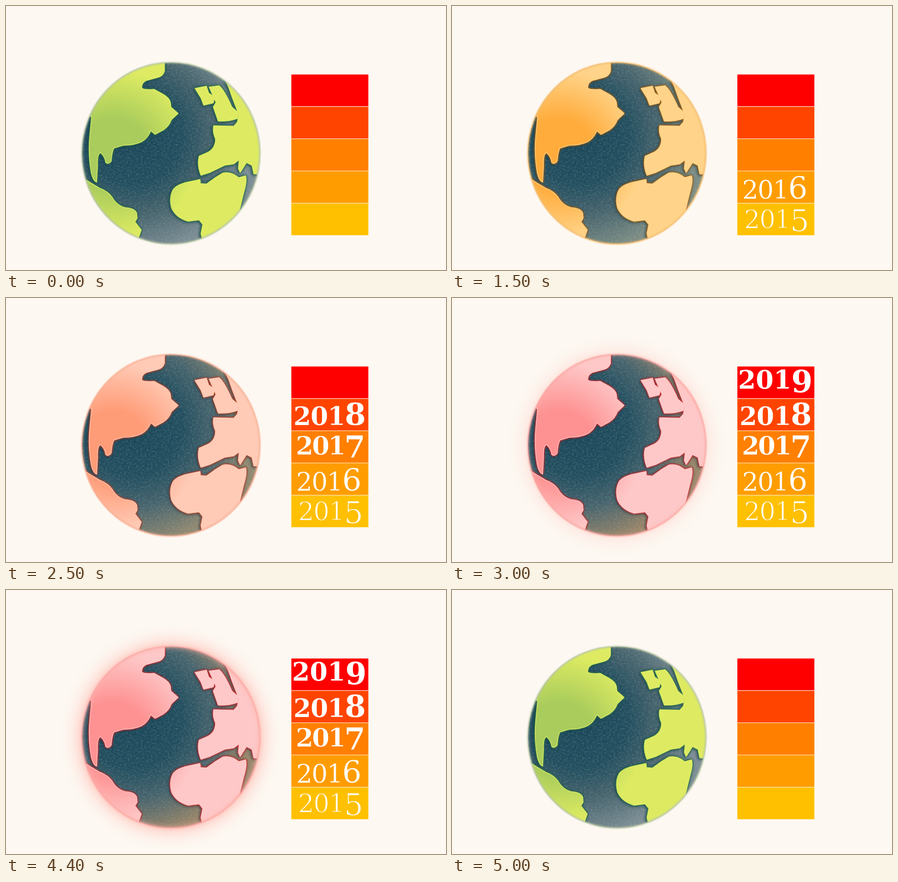
An HTML page that plays this animation: 966 by 580 pixels, repeating every 6 s.

```html
<!DOCTYPE html>
<html lang="en">
<head>
<meta charset="utf-8">
<title>Warming globe</title>
<style>
  html, body { margin: 0; width: 100%; height: 100%; overflow: hidden; background: #fdf8f2; }
  svg { display: block; width: 100%; height: 100%; }
  text { fill: #fff; stroke-linejoin: round; font: 56px "DejaVu Serif", serif; }
  .lands { fill: url(#land); stroke: var(--light); stroke-width: 1.5; stroke-linejoin: round;
           filter: blur(.7px) drop-shadow(0 0 2px var(--fringe)) drop-shadow(0 0 .8px var(--fringe))
                   drop-shadow(-2px 1px 2.5px #0d3442b0); }
</style>
</head>
<body>
<svg id="stage" viewBox="0 0 966 580">
  <defs>
    <radialGradient id="ocean" gradientUnits="userSpaceOnUse" cx="280" cy="285" r="255">
      <stop offset="0" stop-color="#194658"/>
      <stop offset=".42" stop-color="#214d5e"/>
      <stop offset=".68" stop-color="#46636c"/>
      <stop offset="1" style="stop-color: var(--haze)"/>
    </radialGradient>
    <radialGradient id="land" gradientUnits="userSpaceOnUse" cx="235" cy="325" r="195">
      <stop offset=".4" style="stop-color: var(--deep)"/>
      <stop offset=".95" style="stop-color: var(--light)"/>
    </radialGradient>
    <clipPath id="disc"><ellipse cx="362" cy="323.5" rx="195" ry="199"/></clipPath>
    <filter id="soft" x="-5%" y="-5%" width="110%" height="110%"><feGaussianBlur stdDeviation="1.6"/></filter>
    <filter id="halo" x="-40%" y="-40%" width="180%" height="180%"><feGaussianBlur stdDeviation="21"/></filter>
    <filter id="rimBlur" x="-10%" y="-10%" width="120%" height="120%"><feGaussianBlur stdDeviation="4"/></filter>
    <filter id="felt">
      <feTurbulence type="fractalNoise" baseFrequency=".22 .28" numOctaves="2" seed="4"/>
      <feColorMatrix values="0 0 0 0 .45  0 0 0 0 .58  0 0 0 0 .6  2 0 0 0 -.8"/>
      <feComposite in2="SourceGraphic" operator="in"/>
    </filter>
  </defs>

  <rect width="966" height="580" fill="#fdf8f2"/>
  <ellipse id="glow" cx="362" cy="323.5" rx="200" ry="204" fill="#ff6050" filter="url(#halo)"/>

  <ellipse cx="362" cy="323.5" rx="194" ry="198" filter="url(#soft)"
           style="fill: none; stroke: var(--rim); stroke-width: 5"/>
  <g clip-path="url(#disc)">
    <ellipse cx="362" cy="323.5" rx="195" ry="199" fill="url(#ocean)"/>
    <ellipse cx="362" cy="323.5" rx="195" ry="199" filter="url(#felt)" opacity=".24"/>
    <g class="lands">
      <path d="M348 115 V143 Q345 154 333 157 L307 164 Q297 170 298 180 Q302 185 325 183 L345 194 Q359 202 361 212
               L362 222 378 236 363 250 Q358 264 346 272 L327 282 318 274 Q311 291 298 298 Q282 306 257 306 L237 312
               Q232 322 231 341 Q224 349 219 344 Q217 330 207 322 Q200 326 201 350 L199 387
               Q191 384 187 365 Q180 325 184 285 L188 243 150 230 200 110Z"/>
      <path d="M165 375 L185 388 205 400 Q224 407 233 420 Q243 438 262 443 Q282 444 287 455 L288 466 283 474
               297 492 290 512 260 540 160 470Z"/>
      <path d="M415 181 L440 176 445 191 458 200 455 213 434 218 428 202Z"/>
      <path d="M446 178 L468 175 Q480 185 496 222 L510 234 508 247 Q490 254 466 253 L455 222 461 212Z"/>
      <path d="M480 160 L489 179 497 202 511 238 508 255 500 264 456 263 Q453 277 460 292 Q460 312 444 321
               L424 330 Q419 350 428 372 L447 366 480 350 500 347 512 338 510 357 514 366 523 352 528 344
               540 350 544 369 553 369 590 320 550 180Z"/>
      <path d="M426 381 L427 390 440 391 458 378 476 367 Q494 363 511 377 L526 373 Q530 384 522 410 L513 447
               530 470 465 525 431 512 428 500 432 480 424 470 400 473 Q374 466 364 445 Q357 422 367 403
               Q376 392 398 387Z"/>
    </g>
  </g>
  <ellipse cx="362" cy="323.5" rx="194.5" ry="198.5" filter="url(#soft)"
           style="fill: none; stroke: var(--rim); stroke-width: 3; opacity: .65"/>
  <ellipse id="rimGlow" cx="362" cy="323.5" rx="194" ry="198" fill="none" stroke="#ffb5ac" stroke-width="9" filter="url(#rimBlur)"/>

  <g id="scale"></g>
</svg>
<script>
  const stage = document.getElementById('stage');
  const scale = document.getElementById('scale');

  // Land shades, coastline fringe, sea haze and rim, from cool to hot.
  const palettes = [
    ['#a9cc5c', '#deeb62', '#2d7350', '#7b8c93', '#b9c6a4'],
    ['#f9ba14', '#fddc70', '#a8700f', '#748a90', '#f3c65a'],
    ['#ffac3c', '#ffd48a', '#ac6412', '#7c8c84', '#f7bd6c'],
    ['#ffa868', '#ffd0a8', '#b45818', '#868c78', '#f8b880'],
    ['#ff9c78', '#ffcbb6', '#c4442a', '#908870', '#fbb094'],
    ['#fe9292', '#fec8c8', '#dc2c2c', '#988468', '#fda6a2']
  ];
  const paletteNames = ['--deep', '--light', '--fringe', '--haze', '--rim'];

  // Bottom row first; "drop" lowers the final digit, "thin" trims the strokes.
  const rows = [
    { color: '#ffc000', x: 641, base: 488, weight: 400, thin: 1.6, spacing: -2, drop: 7 },
    { color: '#ff9d00', x: 637, base: 423, weight: 400, thin: .4, spacing: -2, drop: 0 },
    { color: '#ff7f00', x: 636, base: 344, weight: 700, thin: .8, spacing: -3.5, drop: 7 },
    { color: '#ff4400', x: 631, base: 279, weight: 700, thin: .4, spacing: -1.5, drop: 0 },
    { color: '#ff0000', x: 628, base: 199, weight: 700, thin: 0, spacing: 0, drop: 8 }
  ];
  scale.innerHTML = rows.map((r, i) => `
    <rect x="626" y="${433.2 - 70.8 * i}" width="170" height="70.8" fill="${r.color}" stroke="#fff4e2"/>
    <text x="${r.x}" y="${r.base}" stroke="${r.color}" stroke-width="${r.thin}"
      style="font-weight:${r.weight};letter-spacing:${r.spacing}px"
      >201<tspan dy="${r.drop}" style="font-size:67px">${5 + i}</tspan></text>`).join('');
  const years = scale.querySelectorAll('text');

  function stateAt(t) {
    if (t < 1000) return [0, 0];
    if (t < 3000) return [1 + Math.floor((t - 1000) / 500), 0];
    if (t < 4400) return [5, Math.min(5, 1 + Math.floor((t - 3000) / 100))];
    const step = Math.floor((t - 4400) / 100);
    return step < 2 ? [5, 3 - 2 * step] : [Math.max(0, 6 - step), 0];
  }

  let shown = '';
  function draw(now) {
    const [heat, glow] = stateAt(now % 6000);
    const key = heat + ',' + glow;
    if (key !== shown) {
      shown = key;
      paletteNames.forEach((name, i) => stage.style.setProperty(name, palettes[heat][i]));
      years.forEach((year, i) => year.setAttribute('visibility', i < heat ? 'visible' : 'hidden'));
      document.getElementById('glow').setAttribute('opacity', glow ? .06 + .115 * glow : 0);
      document.getElementById('rimGlow').setAttribute('opacity', glow * .12);
    }
    requestAnimationFrame(draw);
  }
  draw(performance.now());
</script>
</body>
</html>
```
